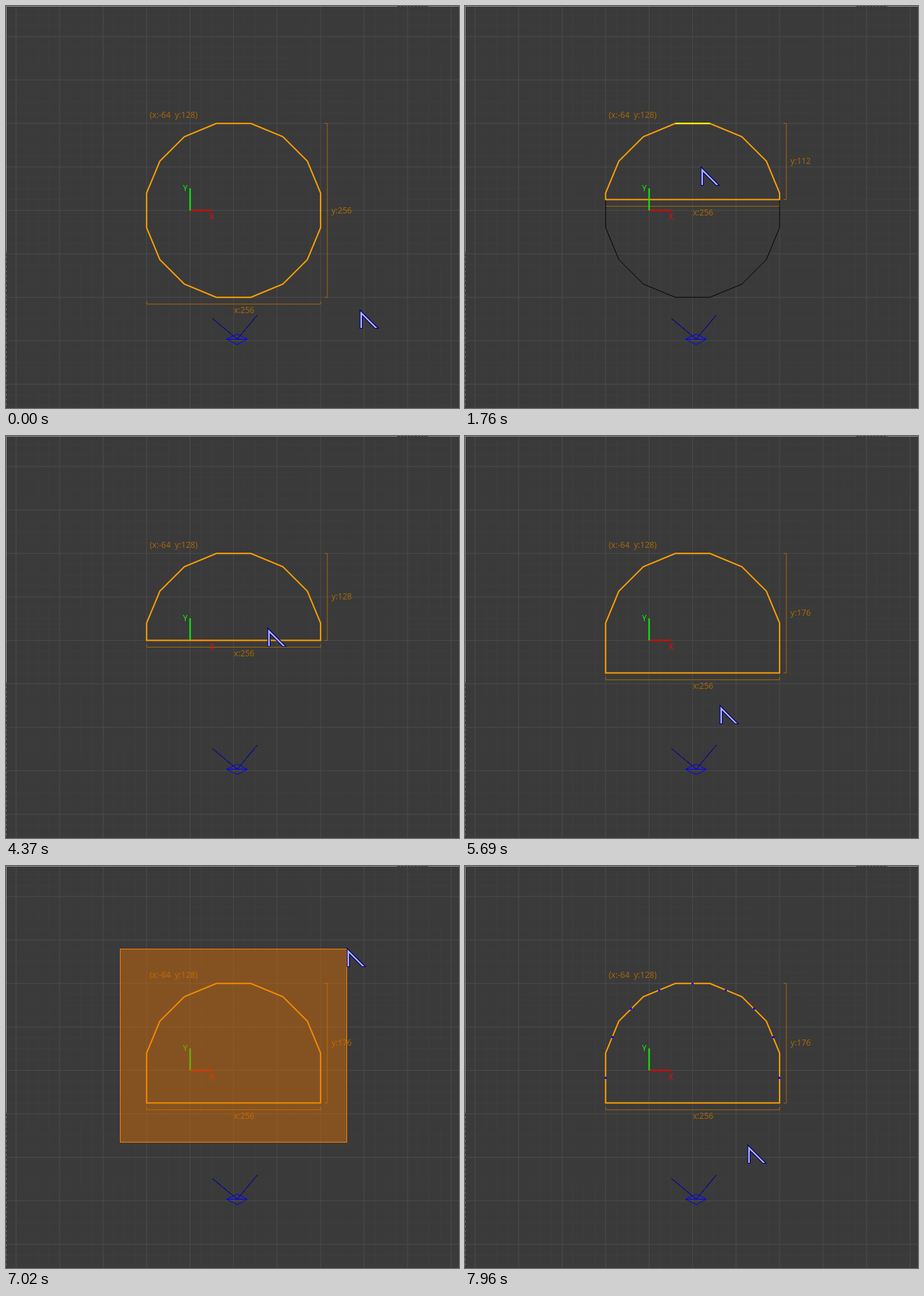
Animation of 668x593 px, one loop 8000 ms. Source, as an HTML page with a canvas:

```html
<!DOCTYPE html>
<html lang="en">
<head>
<meta charset="utf-8">
<title>Brush editing</title>
<style>
html, body { margin: 0; width: 100%; height: 100%; overflow: hidden; background: #3a3a3a; }
canvas { display: block; }
</style>
</head>
<body>
<canvas id="stage" width="668" height="593"></canvas>
<script>
const ctx = document.getElementById('stage').getContext('2d');
const W = 668, H = 593, LOOP = 8000, STEP = 83;
const OX = 271.5, OY = 301.5, UNIT = 1.002;   // world origin, pixels per unit
const CX = OX + 64 * UNIT, R = 128 * UNIT, TOP = OY - R;
const ORANGE = '#ffa000', DIM = '#a66806', YELLOW = '#ffff00', BLUE = '#0000ff';

// Pointer moves: begin, end, x, y and sideways bow as a share of the length
const START = [522, 449];
const MOVES = [
  [680, 1190, 345, 129],
  [1440, 1760, 348, 238],
  [2010, 2160, 352, 252],
  [2500, 2680, 372, 358],
  [3360, 3720, 386, 252],
  [4370, 4370, 386, 284],
  [4460, 4780, 378, 338],
  [4860, 5110, 376, 387],
  [5510, 5690, 376, 398],
  [5770, 6280, 290, 407, 0.55],
  [6370, 6450, 168, 407],
  [6530, 7020, 503, 122],
  [7100, 7960, 417, 412, 0.6]
];

function pointerAt(t) {
  let [x, y] = START;
  for (const [begin, end, toX, toY, bow = 0] of MOVES) {
    if (t < begin) break;
    const gaps = Math.round((end - begin) / STEP);
    const done = gaps ? Math.min(gaps, Math.floor((t - begin) * gaps / (end - begin) + 0.01)) : 0;
    const u = (done + 1) / (gaps + 1), side = bow * 4 * u * (1 - u);
    const dx = toX - x, dy = toY - y;
    x += dx * u - dy * side;
    y += dy * u + dx * side;
  }
  return [Math.round(x), Math.round(y)];
}

const snap = v => Math.round(v / 16) * 16;
const circle = Array.from({ length: 16 }, (_, i) => {
  const a = (i + 0.5) * Math.PI / 8, r = R / Math.cos(Math.PI / 16);
  return [CX + r * Math.cos(a), OY + r * Math.sin(a)];
});

// Keeps the part above (side 1) or below (side -1) a horizontal cut
function clip(poly, y, side) {
  const out = [];
  poly.forEach((p, i) => {
    const q = poly[(i + 1) % poly.length];
    const dp = (y - p[1]) * side, dq = (y - q[1]) * side;
    if (dp >= 0) out.push(p);
    if (dp * dq < 0) out.push([p[0] + (q[0] - p[0]) * dp / (dp - dq), y]);
  });
  return out;
}

function stroke(pts, color, width = 1, closed = false) {
  ctx.beginPath();
  pts.forEach(p => ctx.lineTo(...p));
  if (closed) ctx.closePath();
  ctx.strokeStyle = color;
  ctx.lineWidth = width;
  ctx.stroke();
}

function dashed(pattern, pts, color) {
  ctx.setLineDash(pattern);
  stroke(pts, color);
  ctx.setLineDash([]);
}

function text(str, x, y, color) {
  ctx.fillStyle = color;
  ctx.fillText(str, Math.round(x), Math.round(y));
}

function bounds(poly) {
  const xs = poly.map(p => p[0]), ys = poly.map(p => p[1]);
  return [Math.min(...xs), Math.min(...ys), Math.max(...xs), Math.max(...ys)];
}

function drawGrid() {
  ctx.fillStyle = '#3a3a3a';
  ctx.fillRect(0, 0, W, H);
  for (const [cell, color] of [[16, '#3e3e3e'], [64, '#4b4b4b']]) {
    const size = cell * UNIT;
    for (let x = OX % size; x < W; x += size) stroke([[x, 0], [x, H]], color);
    for (let y = OY % size; y < H; y += size) stroke([[0, y], [W, y]], color);
  }
  stroke([[0, 0.5], [W, 0.5]], '#8c8c8c');
  dashed([4, 1], [[577, 0.5], [623, 0.5]], '#3a3a3a');
  stroke([[0.5, 0], [0.5, 362]], '#8c8c8c');
  dashed([3, 4], [[0.5, 362], [0.5, H]], '#707070');
}

function drawCamera() {
  const eye = [341, 491.5];
  for (const end of [[304.5, 461], [370.5, 456]]) {
    stroke([eye, end], '#000');
    dashed([7, 2], [eye, end], BLUE);
  }
  stroke([[325, 491.5], [356, 491.5]], BLUE);
  stroke([[325, 491.5], [341, 484], [356, 491.5], [341, 499.5]], BLUE, 1, true);
}

function drawSize(poly) {
  const [l, t, r, b] = bounds(poly), x = r + 10, y = b + 10;
  const units = px => Math.round(px / UNIT);
  stroke([[l, y - 4], [l, y], [r, y], [r, y - 4]], DIM);
  stroke([[x - 4, t], [x, t], [x, b], [x - 4, b]], DIM);
  text(`(x:${units(l - OX)}  y:${units(OY - t)})`, l + 4.5, t - 8.5, DIM);
  text('x:' + units(r - l), (l + r) / 2, b + 23.5, DIM);
  text('y:' + units(b - t), r + 16, (t + b) / 2 + 4, DIM);
}

function drawPointer([x, y]) {
  ctx.save();
  ctx.translate(x, y);
  const arrow = [[0, -0.5], [27, 26.5], [22, 26.5], [3.5, 8], [3.5, 26.5], [0, 26.5]];
  ctx.fillStyle = '#b2b4ff';
  ctx.beginPath();
  arrow.forEach(p => ctx.lineTo(...p));
  ctx.fill();
  stroke(arrow, '#000070', 1.2, true);
  ctx.restore();
}

function scene(t, y) {
  if (t < 1440) return { selected: circle };
  if (t < 3180) {
    const depth = Math.max(16, Math.min(128, snap(y - 128)));
    const cut = t < 2500 ? TOP + depth * UNIT : OY;
    const upper = clip(circle, cut, 1), lower = clip(circle, cut, -1);
    return t < 2930 ? { selected: upper, other: lower } : { selected: lower, other: upper };
  }
  const dome = clip(circle, OY, 1);
  if (t < 3970) return { other: dome };
  const grow = t < 4860 ? 0 : t < 5110 ? snap(y - 338) : 48;
  return { selected: dome.map(p => p[1] === OY ? [p[0], OY + grow * UNIT] : p) };
}

function drawMidpoints(poly, bottom) {
  ctx.fillStyle = BLUE;
  poly.forEach((p, i) => {
    const q = poly[(i + 1) % poly.length];
    if (p[1] === bottom && q[1] === bottom) return;
    ctx.fillRect(Math.floor((p[0] + q[0]) / 2 - 1), Math.floor((p[1] + q[1]) / 2 - 1), 3, 3);
  });
}

function drawSelection(poly, t) {
  const [l, , r, b] = bounds(poly), half = R * Math.tan(Math.PI / 16);
  stroke(poly, ORANGE, 2, true);
  if (t >= 1100 && t < 2500) stroke([[CX - half, TOP], [CX + half, TOP]], YELLOW, 2);
  if (t >= 4616 && t < 5110) stroke([[l, b], [r, b]], YELLOW, 2);
  if (t >= 7100) drawMidpoints(poly, b);
}

function drawMarquee([x, y]) {
  const box = [168.5, 407.5, x - 169, y - 407];
  ctx.fillStyle = 'rgba(225,112,0,0.44)';
  ctx.fillRect(...box);
  ctx.strokeStyle = '#ff8000';
  ctx.lineWidth = 1;
  ctx.strokeRect(...box);
}

function draw(t) {
  const pointer = pointerAt(t);
  const { selected, other } = scene(t, pointer[1]);
  ctx.font = '12px "Noto Sans", "Open Sans", sans-serif';
  drawGrid();
  drawCamera();
  stroke([[OX, OY], [304, OY]], '#e00808', 2);
  if (selected) drawSize(selected);
  if (other) stroke(other, '#000', 1, true);
  if (selected) drawSelection(selected, t);
  stroke([[OX, OY], [OX, 269]], '#08f808', 2);
  text('Y', 261, 273, '#08f808');
  text('X', 300, 315, '#f00808');
  if (t >= 6530 && t < 7100) drawMarquee(pointer);
  drawPointer(pointer);
}

function frame() {
  draw(performance.now() % LOOP);
  requestAnimationFrame(frame);
}
frame();
</script>
</body>
</html>
```
